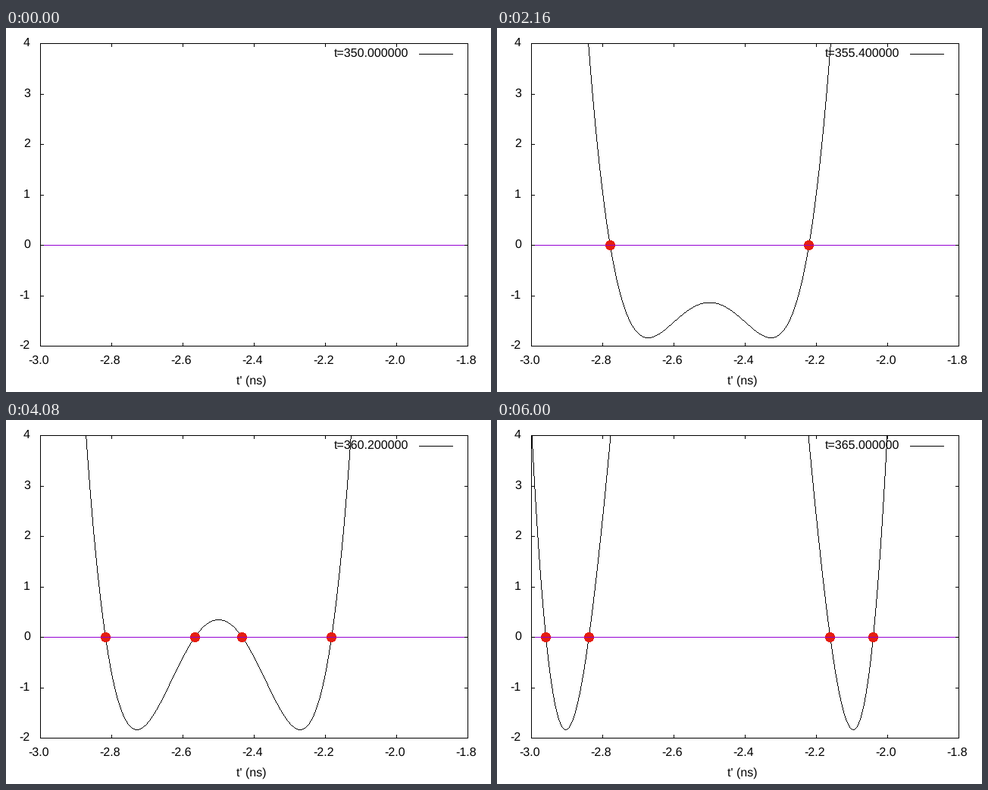
Write a matplotlib script that moves like this. It is 640 px wide and 480 px high and loops after 6080 ms.

```python
import numpy as np
import matplotlib.pyplot as plt
from matplotlib.animation import FuncAnimation
from matplotlib.patches import Circle

W, H, DPI = 640, 480, 72
FRAMES, INTERVAL = 76, 80
LEFT, RIGHT, TOP, BOTTOM = 45.5, 609.5, 20.5, 419.5
CENTER = -2.5      # symmetry axis of the well
DEPTH = 1.838      # depth of the minima
HALF = 0.0482      # half distance of the roots in x^2

plt.rcParams.update({
    "font.family": "Liberation Sans",
    "font.size": 16,
    "path.simplify": False,
    "text.hinting": "none",
    "text.hinting_factor": 1,
})


def px(v):
    return LEFT + (v + 3.0) / 1.2 * (RIGHT - LEFT)


def py(v):
    return BOTTOM - (v + 2) / 6 * (BOTTOM - TOP)


def mid(p):
    """Centre of the pixel that holds p."""
    return np.floor(p + 1e-6) + 0.5


def well(n):
    """Squared distance of the minima from the centre: drift plus oscillation."""
    drift = -0.0692 + 0.00282 * n + 2.7e-8 * n**2 * (60 - n)
    return drift - 0.0229 * np.cos(2 * np.pi * n / 50)


fig = plt.figure(figsize=(W / DPI, H / DPI), dpi=DPI, facecolor="white")
ax = fig.add_axes([0, 0, 1, 1])
ax.set_xlim(0, W)
ax.set_ylim(H, 0)
ax.axis("off")


def line(xs, ys, color="black", z=5, cap="projecting"):
    return ax.plot(xs, ys, color=color, lw=1, aa=False, snap=False, zorder=z,
                   solid_capstyle=cap, solid_joinstyle="miter")[0]


def label(x, y, s, ha):
    return ax.text(x, y, s, ha=ha, va="baseline", color="black", zorder=6)


# Border, ticks and labels
line([LEFT, RIGHT, RIGHT, LEFT, LEFT], [TOP, TOP, BOTTOM, BOTTOM, TOP])
for v in range(-2, 5):
    y = mid(py(v))
    line([LEFT, LEFT + 4], [y, y])
    line([RIGHT - 4, RIGHT], [y, y])
    label(32, y + 3.5, str(v), "right")
for i in range(7):
    v = -3 + 0.2 * i
    x = mid(px(v))
    line([x, x], [BOTTOM, BOTTOM - 4])
    line([x, x], [TOP, TOP + 4])
    label(x - 2, 443, f"{v:.1f}", "center")
label(304, 470, "t' (ns)", "left")

# Key
key = label(432.4, 38, "", "left")
line([545.5, 589.5], [34.5, 34.5])

# Data
zero = mid(py(0))
line([LEFT, RIGHT], [zero, zero], "#9400d3", 4)
curve = line([], [], z=2, cap="butt")
dots = [ax.add_patch(Circle((0, zero), 6, fc="#e51e10", lw=0, aa=False,
                            snap=False, zorder=3)) for _ in range(4)]
edges = np.arange(LEFT + 0.5, RIGHT)
edge_x = -3 + (edges - LEFT) / (RIGHT - LEFT) * 1.2 - CENTER


def hairline(ys):
    """One vertical run per pixel column, for a crisp one-pixel curve."""
    rows = np.floor(ys)
    lo = np.minimum(rows[:-1], rows[1:])
    hi = np.maximum(np.maximum(rows[:-1], rows[1:]), lo + 1)
    shown = hi > TOP
    cols = edges[:-1][shown] + 0.5
    gap = np.full(cols.size, np.nan)
    lo = np.maximum(lo[shown], TOP + 0.5)
    return (np.column_stack([cols, cols, gap]).ravel(),
            np.column_stack([lo, hi[shown], gap]).ravel())


def update(n):
    c = well(n)
    f = DEPTH * ((edge_x**2 - c) ** 2 / HALF**2 - 1)
    curve.set_data(*hairline(py(f)))
    roots = [CENTER + s * np.sqrt(q)
             for q in (c + HALF, c - HALF) if q > 0 for s in (-1, 1)]
    for i, dot in enumerate(dots):
        dot.set_visible(i < len(roots))
        if i < len(roots):
            dot.center = mid(px(roots[i])), zero
    key.set_text(f"t={350 + 0.2 * n:f}")
    return [curve, key, *dots]


anim = FuncAnimation(fig, update, frames=FRAMES, interval=INTERVAL,
                     repeat=True, repeat_delay=0, blit=False)
plt.show()
```
